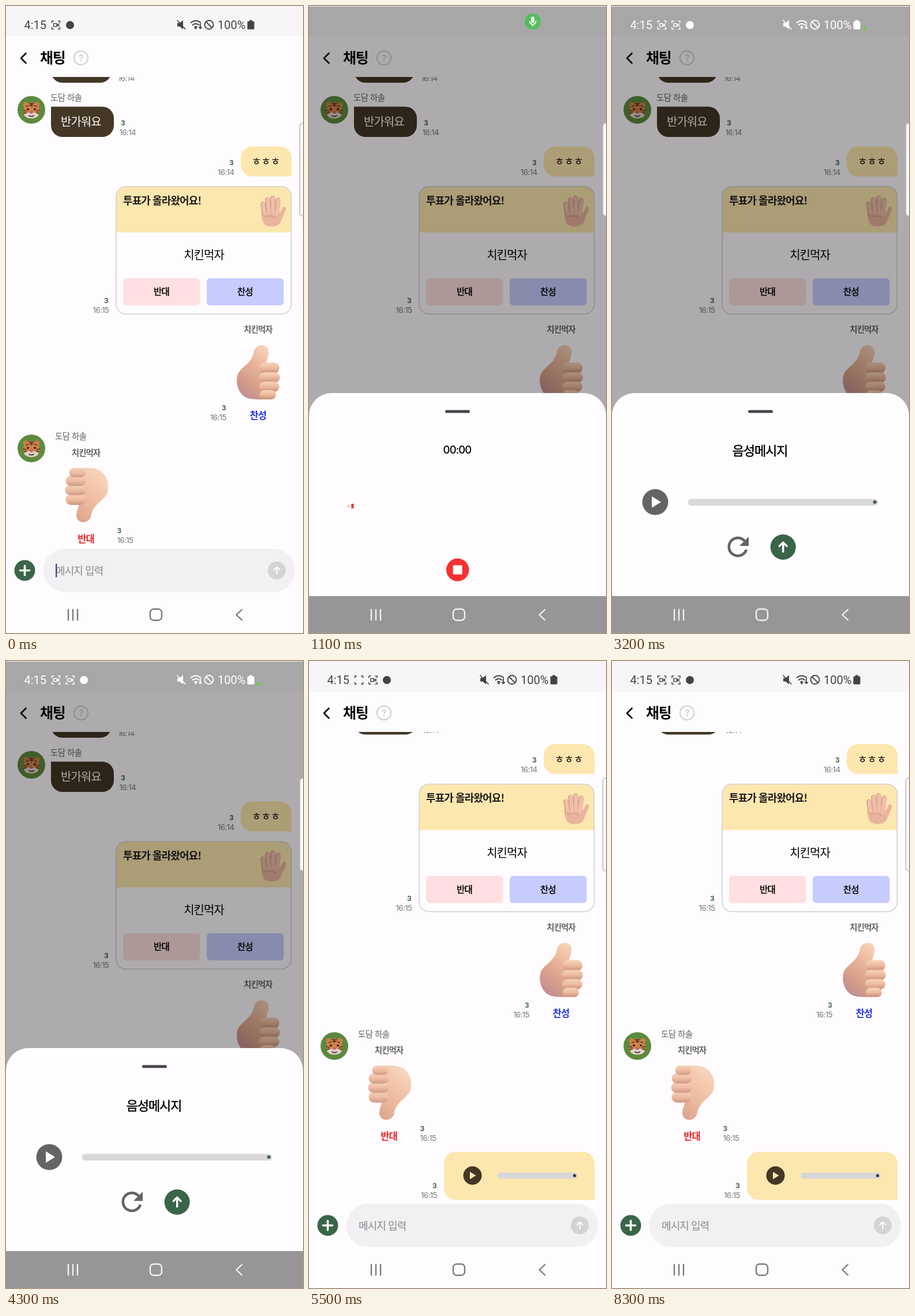
An HTML page that plays this animation: 515 by 1087 pixels, repeating every 8400 ms.

```html
<!DOCTYPE html>
<html lang="ko">
<head>
<meta charset="utf-8">
<title>음성메시지</title>
<style>
html, body { margin: 0; width: 100%; height: 100%; overflow: hidden; background: #fffcff; }
svg { display: block; width: 515px; height: 1087px; }
text { font-family: "Noto Sans CJK KR", "Noto Sans CJK", sans-serif; letter-spacing: -.05em; }
.num { font-family: Inter, "Noto Sans", sans-serif; }
.clock { font-family: Roboto, sans-serif; font-size: 20px; letter-spacing: 0; }
.mid { text-anchor: middle; }
.medium { stroke: #000; stroke-width: .45px; }
.line { fill: none; stroke: currentColor; stroke-linecap: round; stroke-linejoin: round; }
.name { font-size: 14.5px; fill: #626062; letter-spacing: -.04em; }
.topic { font-size: 14.5px; font-weight: 600; fill: #666467; text-anchor: middle; letter-spacing: -.07em; }
.count { font-size: 12px; font-weight: 700; fill: #3d6547; }
.time { font-size: 13.5px; fill: #7b797b; }
.label { font-size: 18px; text-anchor: middle; }
.up { --skin: url(#skinUp); --finger: url(#fingerUp); }
.down { --skin: url(#skinDown); --finger: url(#fingerDown); }
.skin { fill: var(--skin); }
.fingers { fill: var(--finger); }
</style>
</head>
<body>
<svg viewBox="0 0 515 1087" id="stage"></svg>
<script>
const DARK = '#443726', YELLOW = '#fce7ae', GREEN = '#3b6548', RED = '#f93030', GREY = '#666367';

// Rounded box with separate corner radii: top-left, top-right, bottom-right, bottom-left
const box = (x, y, w, h, [a, b, c, d], fill) =>
  `<path fill="${fill}" d="M${x + a} ${y}h${w - a - b}a${b} ${b} 0 0 1 ${b} ${b}v${h - b - c}a${c} ${c} 0 0 1 ${-c} ${c}h${c + d - w}a${d} ${d} 0 0 1 ${-d} ${-d}v${a + d - h}a${a} ${a} 0 0 1 ${a} ${-a}z"/>`;
const stamp = (countX, timeX, y, time) =>
  `<text class="num count" x="${countX}" y="${y}">3</text><text class="num time" x="${timeX}" y="${y + 17}">${time}</text>`;
const arrow = (x, y, s, w) =>
  `<path class="line" color="#fff" stroke-width="${w}" d="M${x} ${y + s}v${-2 * s}m${-s * .8} ${s * .8}l${s * .8} ${-s * .8}l${s * .8} ${s * .8}"/>`;
const avatar = y => `<use href="#tiger" x="44" y="${y}"/>`;
const name = (x, y) => `<text class="name" x="${x}" y="${y}">도담 하솔</text>`;
const gradient = (id, [x1, y1, x2, y2], colors) =>
  `<linearGradient id="${id}" x1="${x1}" y1="${y1}" x2="${x2}" y2="${y2}">${colors.map((c, i) =>
    `<stop offset="${i / (colors.length - 1)}" stop-color="${c}"/>`).join('')}</linearGradient>`;

const defs = `<defs>
  ${gradient('skinUp', [.75, 0, .2, 1], ['#f9d6bb', '#ebb99d', '#d9a08b', '#bd8c90'])}
  ${gradient('skinDown', [.15, 1, .75, 0], ['#f8d8c2', '#f3c8ae', '#ebb79d', '#dca48d'])}
  ${gradient('fingerUp', [0, 0, 0, 1], ['#f8d4b8', '#ecbb9d', '#c98f79'])}
  ${gradient('fingerDown', [0, 1, 0, 0], ['#f6d0b6', '#edbea3', '#cf9882'])}
  <clipPath id="feed"><rect y="123" width="515" height="818"/></clipPath>
  <g id="tiger">
    <circle r="24" fill="#5c8a3e"/>
    <g fill="#cf7f48"><circle cx="-10" cy="-9" r="4.500"/><circle cx="10" cy="-9" r="4.500"/>
      <path d="M0 -13C10 -13 14 -6 14 2C14 11 8 15 0 15S-14 11 -14 2C-14 -6 -10 -13 0 -13z"/></g>
    <path fill="#ddd0c8" d="M-13 8C-9 6 -5 4 0 4S9 6 13 8C11 13 6 15 0 15S-11 13 -13 8z"/>
    <path class="line" color="#4a3026" stroke-width="1.600" d="M-4 -11h8M-3 -8h6M0 -11v5M-14 1l5 1M14 1l-5 1M-13 6l4 -1M13 6l-4 -1M-9 -6l3 -1M9 -6l-3 -1M-4 10q4 3 8 0"/>
    <circle cx="-6" cy="-1" r="1.800" fill="#1f1915"/><circle cx="6" cy="-1" r="1.800" fill="#1f1915"/>
    <ellipse cy="4.500" rx="3" ry="2" fill="#b9686a"/>
  </g>
  <g id="thumb">
    <path class="skin" d="M-7 -36C-4 -50 17 -51 18.500 -36C19 -28 14 -20 13 -13L31 0L27 45C10 48 -10 48 -20 44C-33 38 -39 21 -36 7C-33 -9 -11 -13 -7 -36z"/>
    <g class="fingers"><rect x="3" y="-17" width="34" height="19" rx="9"/><rect x="2" y="0" width="36" height="18" rx="9"/>
      <rect x="2" y="16" width="35" height="18" rx="9"/><rect x="3" y="31" width="28" height="16" rx="8"/></g>
  </g>
  <g id="palm">
    <path fill="#e9b49d" d="M443 356C450 346 470 346 475 359L480 349C483 346 487 350 485 354C481 362 478 371 475 377C468 384 452 384 447 377C444 371 442 362 443 356z"/>
    <path class="line" color="#d39a87" stroke-width="8.500" d="M448 360L445.500 343.500M455.500 356L453.500 336M462.500 356V333M469 358L472 337"/>
    <path class="line" color="#efc0a9" stroke-width="6.500" d="M448.500 360L446 343.500M456 358L454 336M463 358V333M469.500 360L472.500 337"/>
    <path class="line" color="#cf9482" stroke-width="1.200" d="M449 366q12 -5 18 2"/>
  </g>
  <path id="brackets" class="line" stroke-width="1.600" d="M-7 -4v-3h3M4 -7h3v3M7 4v3h-3M-4 7h-3v-3"/>
  <path id="camera" class="line" stroke-width="1.400" d="M-4 -2.500h5.500v5h-5.500zM2.500 -.5l2.500 -1.500v4l-2.500 -1.500"/>
</defs>`;

const messages = `<g clip-path="url(#feed)"><g id="list">
  ${box(78, 84, 105, 49, [0, 20, 20, 20], DARK)}<text class="num time" x="194" y="130">16:14</text>
  ${avatar(180)}${name(77, 163.5)}
  ${box(78, 174.5, 109, 52.5, [0, 20, 20, 20], DARK)}<text x="95" y="208" font-size="20" fill="#fffaf4">반가워요</text>
  ${stamp(199, 196.5, 207, '16:14')}
  ${box(407, 243.5, 88, 52, [20, 20, 0, 20], YELLOW)}<text x="426" y="276" font-size="18" style="letter-spacing:0">ㅎㅎㅎ</text>
  ${stamp(387, 367, 275.5, '16:14')}
  ${box(191, 313, 303, 79.5, [16, 16, 0, 0], YELLOW)}
  <rect x="191" y="313" width="303.500" height="221" rx="17" fill="none" stroke="#d2d0d2" stroke-width="1.600"/>
  <text x="203" y="343.500" font-size="18" font-weight="700" fill="#1d1b1d">투표가 올라왔어요!</text>
  <use href="#palm"/>
  <text class="mid" x="343" y="439" font-size="20">치킨먹자</text>
  <rect x="203" y="472" width="133.500" height="47" rx="6" fill="#ffdfe0"/>
  <rect x="348" y="472" width="133.500" height="47" rx="6" fill="#c7ccff"/>
  <g class="mid medium" font-size="15.500"><text x="269.500" y="501">반대</text><text x="414.500" y="501">찬성</text></g>
  ${stamp(170, 150.5, 515, '16:15')}
  <text class="topic" x="437" y="566">치킨먹자</text>
  <use class="up" href="#thumb" x="437" y="635"/>
  <text class="mid" x="437" y="716" font-size="16.500" font-weight="700" fill="#2136e6">찬성</text>
  ${stamp(374, 354, 700.5, '16:15')}
  ${avatar(767)}${name(85, 751)}
  <text class="topic" x="138.500" y="779.500">치킨먹자</text>
  <use class="down" href="#thumb" transform="translate(140.500 848) rotate(180)"/>
  <text class="mid" x="138.500" y="929.500" font-size="16.500" font-weight="700" fill="#ee2424">반대</text>
  ${stamp(192.5, 192.5, 914, '16:15')}
  <g id="voice">
    ${box(234, 950.5, 261, 83, [20, 20, 0, 20], YELLOW)}
    <circle cx="283.500" cy="991.500" r="16" fill="${DARK}"/>
    <path id="voicePlay" fill="${YELLOW}" d="M279 985v13l10.500 -6.500z"/>
    <path id="voicePause" stroke="${YELLOW}" stroke-width="2.800" d="M280.500 986v11M286.500 986v11"/>
    <rect id="rest" y="986.500" height="10.500" rx="5.200" fill="#d7d6d8"/>
    <rect id="played" x="327" y="986.500" height="10.500" rx="5.200" fill="${DARK}"/>
    <circle cx="460.500" cy="991.700" r="2.600" fill="${DARK}"/>
    ${stamp(214, 194, 1013.5, '16:15')}
  </g>
</g></g>`;

const frame = `<rect width="515" height="1087" fill="#fffcff"/><rect width="515" height="53" fill="#f7f5f7"/>
  <path class="line" stroke-width="2.600" d="M34.500 82L26 90.500L34.500 99"/>
  <text x="59" y="99" font-size="25" font-weight="700">채팅</text>
  <circle cx="130" cy="90" r="12" fill="none" stroke="#d7d4d7" stroke-width="2.500"/>
  <text class="num mid" x="130" y="96" font-size="16" font-weight="600" fill="#d0cdd0">?</text>
  ${messages}
  <rect x="64.500" y="941" width="437" height="75" rx="37.500" fill="#f2f0f3"/>
  <text x="86" y="985.500" font-size="18" fill="#89878a">메시지 입력</text>
  <rect id="cursor" x="86" y="967" width="2.400" height="23.500" fill="#4b4a9c"/>
  <circle cx="469.500" cy="978.500" r="15.500" fill="#d6d3d6"/>${arrow(469.5, 978.5, 6, 2)}
  <circle cx="32.500" cy="978.500" r="18" fill="${GREEN}"/>
  <path class="line" color="#fff" stroke-width="3.600" d="M24.500 978.500h16M32.500 970.500v16"/>
  <rect id="scrim" y="1" width="515" height="1086"/>
  <rect x="509.500" y="203" width="12" height="161" rx="5" fill="#fffcff" stroke="#bbb9bb" stroke-width="1.600"/>`;

const status = `<g id="status" fill="currentColor">
  <text class="clock" x="31.500" y="39.500">4:15</text>
  <use href="#brackets" x="86.500" y="33"/><use id="blink" href="#camera" x="86.500" y="33"/>
  <g id="second"><use href="#brackets" x="111" y="33"/><use href="#camera" x="111" y="33"/></g>
  <circle id="badge" cy="33" r="7"/>
  <path d="M297 29.500h4l6 -5v16l-6 -5h-4z"/><path class="line" stroke-width="1.700" d="M297 25l14 15"/>
  <path class="line" stroke-width="1.800" d="M320.500 29q8.500 -7 17 0M323.500 33q5.500 -4.500 11 0M327 36.500q2.500 -2 4 0M337 31v8m-2 -2l2 2l2 -2"/><circle cx="329" cy="38.500" r="1.800"/>
  <circle class="line" cx="352" cy="32.500" r="7.500" stroke-width="1.900"/><path class="line" stroke-width="1.900" d="M347 27.500l10 10"/>
  <text class="clock" x="367" y="39.500">100%</text>
  <path d="M422 24.500h5v2h2q1.500 0 1.500 1.500v11q0 1.500 -1.500 1.500h-9q-1.500 0 -1.500 -1.500v-11q0 -1.500 1.500 -1.500h2z"/>
</g>
<circle id="dot" cx="438" cy="39.500" r="3" fill="#63d33c"/>
<g id="chip"><circle cx="388" cy="27" r="14" fill="#55bd5c"/><rect x="385" y="18.500" width="6" height="11" rx="3" fill="#fff"/>
  <path class="line" color="#fff" stroke-width="1.700" d="M382.500 26.500a5.500 5.500 0 0 0 11 0M388 32v3"/></g>`;

const barHeight = i => i ? [8, 24, 32, 24, 17, 23, 22, 20, 20, 21, 24, 14, 17][(i - 1) % 13] : 1;
const bars = Array.from({ length: 20 }, (_, i) =>
  `<rect class="bar" x="${66.5 + i * 6.73}" y="${867 - barHeight(i) / 2}" width="4.400" height="${barHeight(i)}" fill="#e93d34"/>`).join('');

const sheet = `<g id="sheet">
  <g id="panel">${box(0, 671, 515, 420, [39, 39, 0, 0], '#fffdff')}<rect x="236" y="700.500" width="43" height="5" rx="2.500" fill="#48444a"/></g>
  <g id="menu">
    <circle cx="191.500" cy="851" r="46.500" fill="#e9edb1"/><circle cx="323.500" cy="851" r="46.500" fill="#c5dc6c"/>
    <path class="line" stroke-width="2.300" d="M177.500 829h28v19a14 14 0 0 1 -28 0zM177.500 833h-7v5q0 9 9 12M205.500 833h7v5q0 9 -9 12M191.500 862v5M182 873q0 -6 9.500 -6t9.500 6M179 873h25"/>
    <circle class="line" cx="324" cy="851" r="22" stroke-width="2.400"/>
    <path class="line" stroke-width="2.300" d="M311 848v6M317.500 843v16M324 846v10M330.500 841v20M337 847v8"/>
    <text class="label medium" x="190.500" y="929.500">찬반투표</text><text class="label medium" x="323" y="929.500">음성메시지</text>
  </g>
  <g id="record">
    <text id="timer" class="num mid" x="257" y="775.500" font-size="18.500" font-weight="500"></text>${bars}
    <circle cx="257.700" cy="977.500" r="19.700" fill="${RED}"/><rect id="stop" x="249.700" y="969.500" width="16" height="16" rx="1" fill="#fff"/>
  </g>
  <g id="review">
    <text class="mid medium" x="256.500" y="779" font-size="22">음성메시지</text>
    <circle cx="75" cy="860" r="22.500" fill="${GREY}"/><path fill="#fff" d="M69 850v20l16 -10z"/>
    <rect x="131.500" y="854.500" width="330" height="11.500" rx="5.700" fill="#d9d7da"/><circle cx="455.700" cy="860" r="3" fill="${GREEN}"/>
    <path fill="none" stroke="${GREY}" stroke-width="4.600" d="M230 927.500a15.500 15.500 0 1 0 3 15"/><path fill="${GREY}" d="M237 920v16h-16z"/>
    <circle cx="296.700" cy="938" r="22" fill="${GREEN}"/>${arrow(296.7, 938, 8, 3.4)}
  </g>
</g>`;

const nav = `<rect id="navDim" y="1023" width="515" height="64" fill="#979597"/>
  <g id="nav" class="line" stroke-width="2.400"><path d="M108 1046.500v18M116 1046.500v18M124 1046.500v18"/>
  <rect x="250" y="1045.500" width="20" height="19.500" rx="6"/><path d="M409 1046.500L399.500 1055.500L409 1064.500"/></g>`;

const stage = document.getElementById('stage');
stage.innerHTML = defs + frame + status + sheet + nav;

const el = id => document.getElementById(id);
const show = (id, on) => el(id).style.display = on ? '' : 'none';
const clamp = v => Math.min(1, Math.max(0, v));
const ease = v => 1 - (1 - clamp(v)) ** 2;
const grey = v => `rgb(${v},${v},${v})`;

function draw(t) {
  const open = t < 4400 ? ease((t - 50) / 200) : 1 - clamp((t - 4400) / 200);
  const isMenu = t < 600, isRecord = t >= 600 && t < 2900, isReview = t >= 2900 && t < 4600;
  const grow = 13.5 * (1 - ease((t - 500) / 200));
  const darken = t < 300 ? 1 - open : clamp((t - 4600) / 300);

  el('scrim').setAttribute('opacity', .32 * open);
  show('sheet', open > 0);
  el('sheet').setAttribute('transform', `translate(0 ${(1 - open) * 352})`);
  el('panel').setAttribute('transform', `translate(0 ${grow})`);
  show('menu', isMenu); show('record', isRecord); show('review', isReview);

  show('chip', t >= 1100 && t < 2600);
  show('status', t < 1100 || t >= 2600);
  show('dot', t >= 2600 && t < 4500);
  show('blink', t % 1000 < 500);
  show('second', t >= 200);
  el('badge').setAttribute('cx', t >= 200 ? 135 : 111);
  el('status').setAttribute('color', grey(255 - 187 * darken));
  el('nav').setAttribute('color', grey((open ? 242 : 236) - 114 * darken));
  el('navDim').setAttribute('opacity', open);

  el('timer').textContent = t < 2000 ? '00:00' : '00:01';
  document.querySelectorAll('.bar').forEach((bar, i) => bar.style.display = t >= 1000 + i * 100 ? '' : 'none');
  show('stop', t >= 1000);

  const sent = t >= 4900, playing = t >= 6000 && t < 8000;
  el('list').setAttribute('transform', `translate(0 ${sent ? -99.5 : 0})`);
  show('voice', sent); show('cursor', t < 5200);
  show('voicePlay', !playing); show('voicePause', playing);
  const width = playing ? 139 * (t - 6000) / 2100 : 0;
  const start = width ? width + 6 : 0;
  el('played').setAttribute('width', width);
  el('rest').setAttribute('x', 327 + start);
  el('rest').setAttribute('width', Math.max(0, 139 - start));
}

function tick() {
  draw(Math.floor(performance.now() % 8400 / 100) * 100);
  requestAnimationFrame(tick);
}
tick();
</script>
</body>
</html>
```
